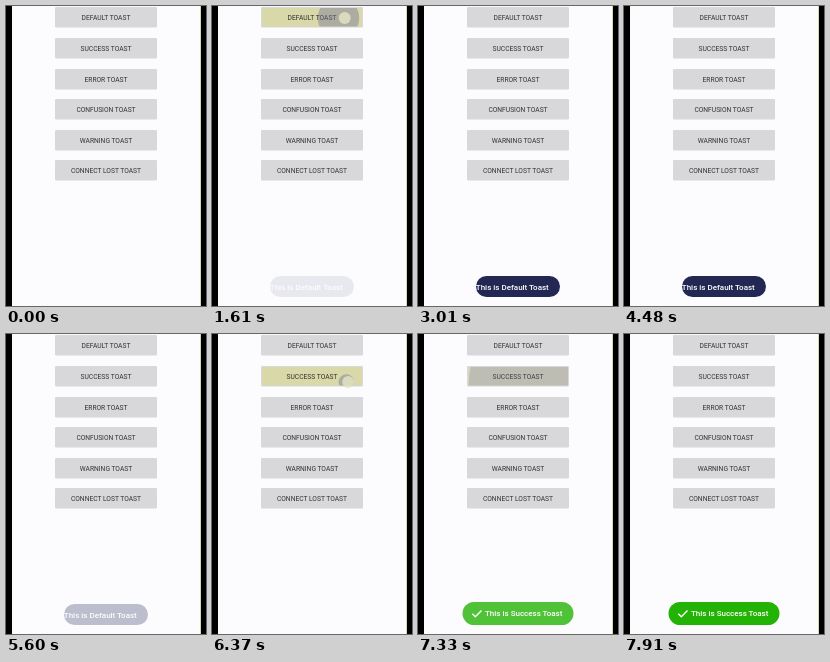
An HTML page for the animation above (8 s loop, 200x300 px).

```html
<!DOCTYPE html>
<html lang="en">
<head>
<meta charset="utf-8">
<title>Toast demo</title>
<style>
  html, body { margin: 0; width: 100%; height: 100%; overflow: hidden; background: #000; }
  svg { display: block; width: 200px; height: 300px; font-family: Roboto, sans-serif; }
  .label { font-size: 6.7px; fill: #333; text-anchor: middle; }
  .toast text { font-size: 8px; font-weight: 500; fill: #fff; }
</style>
</head>
<body>
<svg viewBox="0 0 200 300">
  <rect width="200" height="300"/>
  <rect x="6" width="189" height="300" fill="#fcfcff"/>
  <rect x="194" width="1" height="300" fill="#d8d8a8"/>
  <g id="buttons"></g>
  <g class="toast" id="plain">
    <rect x="58" y="270" width="84" height="21" rx="10.5" fill="#222853"/>
    <text x="57.8" y="283.6">This is Default Toast</text>
  </g>
  <g class="toast" id="success">
    <rect x="44.5" y="268" width="111" height="23" rx="11.5" fill="#22b304"/>
    <path d="M54.3 279.8L57.3 282.8L63.5 276.4" fill="none" stroke="#fff" stroke-width="1.4"/>
    <text x="67" y="282.2">This is Success Toast</text>
  </g>
</svg>
<script>
const LOOP = 8000;
const labels = ['DEFAULT', 'SUCCESS', 'ERROR', 'CONFUSION', 'WARNING', 'CONNECT LOST'];
const byId = id => document.getElementById(id);
const clamp = v => Math.max(0, Math.min(1, v));
const progress = (t, start, length) => clamp((t - start) / length);
const easeOut = p => 1 - (1 - p) ** 2;
const easeIn = p => p * p;

byId('buttons').innerHTML = labels.map((label, i) => {
  const y = [1, 32, 63, 93, 124, 154][i];
  const face = `<rect x="50" y="${y + 1}" width="100" height="18.5" rx="1"`;
  return `<clipPath id="clip${i}">${face}/></clipPath>
    <rect x="49" y="${y}" width="102" height="20.5" rx="1.2" fill="#d8d8da"/>
    ${face} fill="#d8d8a8" id="tint${i}" opacity="0"/>
    <text class="label" x="100" y="${y + 13}">${label} TOAST</text>
    <g clip-path="url(#clip${i})"><circle id="ripple${i}" fill="#6e6e96" r="0"/></g>
    <circle id="dot${i}" r="6" fill="#e2e2c4" opacity="0"/>`;
}).join('');

// down/up: finger contact; start: first ripple; fade: ripple begins to vanish
const presses = [
  { x: 133.5, y: 12, down: 1120, up: 1720, start: 1260, fade: 2150 },
  { x: 137, y: 48, down: 6140, up: 6680, start: 6240, fade: 7030 }
];

function set(id, attrs) {
  for (const name in attrs) byId(id).setAttribute(name, attrs[name]);
}

function drawPress(p, i, t) {
  const age = Math.max(0, t - p.start) / 1000;
  const fade = 1 - progress(t, p.fade, 740);
  set('tint' + i, { opacity: progress(t, p.start, 100) * fade });
  set('ripple' + i, { cx: p.x - 20 * age, cy: p.y, r: 59 * age, opacity: 0.42 * fade });
  set('dot' + i, { cx: p.x - 0.8, cy: p.y, opacity: t >= p.down && t < p.up ? 0.85 : 0 });
}

function frame() {
  const t = performance.now() % LOOP;
  presses.forEach((p, i) => drawPress(p, i, t));
  const shown = easeOut(progress(t, 1550, 1400));
  const gone = easeIn(progress(t, 4470, 1340));
  set('plain', { opacity: shown * (1 - gone) });
  set('success', { opacity: easeOut(progress(t, 6640, 1270)) });
  requestAnimationFrame(frame);
}
frame();
</script>
</body>
</html>
```
